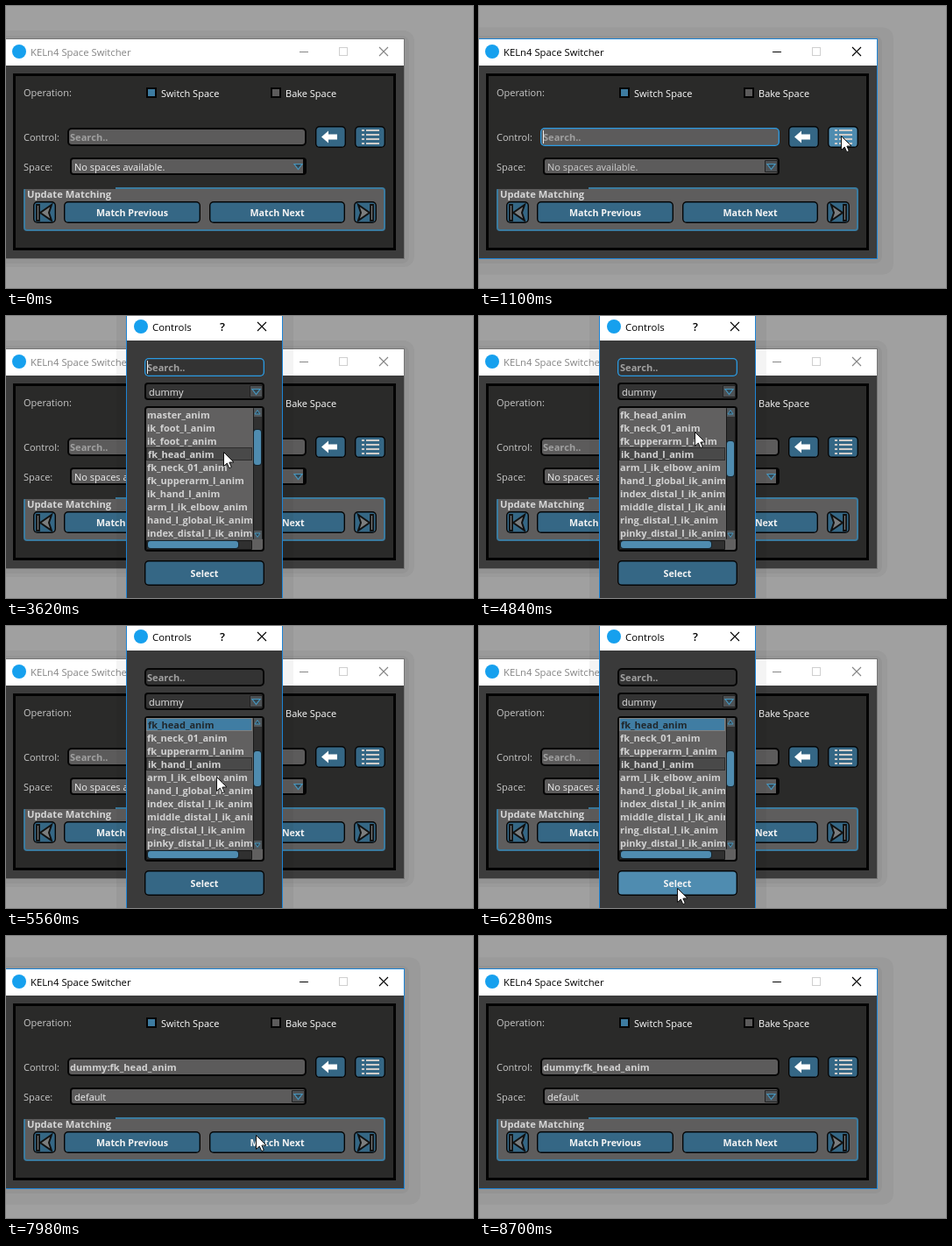
Recreate the animation shown at these times as an HTML page with a canvas. Size 533 px wide and 322 px high, loop 9.2 s.

```html
<!DOCTYPE html>
<html lang="en">
<head>
<meta charset="utf-8">
<title>Space Switcher</title>
<style>
html, body { margin: 0; width: 533px; height: 322px; overflow: hidden; background: #a0a0a0; }
canvas { display: block; }
</style>
</head>
<body>
<canvas id="stage" width="533" height="322"></canvas>
<script>
const ctx = document.getElementById('stage').getContext('2d');
const LOOP = 9200, STEP = 120;
const FONT = '"Open Sans", "Noto Sans", sans-serif';
const BLUE = '#356785', BRIGHT = '#4f8cb0', FOCUS = '#2b9be3', EDGE = '#1d84d6';
const FIELD = '#5c5b5b', DARK = '#333', PANEL = '#2a2a29', BLACK = '#050505';

const ITEMS = ['torso_body', 'fk_spine_01', 'torso_chest_ik', 'master', 'ik_foot_l', 'ik_foot_r',
  'fk_head', 'fk_neck_01', 'fk_upperarm_l', 'ik_hand_l', 'arm_l_ik_elbow', 'hand_l_global_ik',
  'index_distal_l_ik', 'middle_distal_l_ik', 'ring_distal_l_ik', 'pinky_distal_l_ik'
].map(s => s + '_anim');

const ENTER = 250, ACTIVATE = 1100, OPEN = 1220, SCROLL = 3620, PICK = 5200,
  CLOSE = 6290, DROP = 7360, LEAVE = 8700;

// pointer moves: start, duration, then the point reached
const HOME = [426, 264];
const MOVES = [
  [250, 240, 413, 148],
  [1850, 240, 382, 149],
  [2090, 840, 248, 155],
  [4720, 360, 245, 114],
  [5320, 240, 240, 172],
  [5560, 360, 226, 299],
  [6520, 600, 190, 190],
  [7860, 720, 502, 312]
];

function pointerAt(t) {
  if (t < ENTER || t >= LEAVE) return null;
  let [x, y] = HOME;
  for (const [from, span, toX, toY] of MOVES) {
    if (t < from) break;
    const u = Math.min(1, Math.floor((t - from) / STEP) * STEP / span);
    const e = u * (2 - u);
    x += (toX - x) * e;
    y += (toY - y) * e;
  }
  return [Math.round(x), Math.round(y)];
}

const blink = (t, since) => Math.floor((t - since) / 510) % 2 === 0;

function rect(x, y, w, h, c) {
  ctx.fillStyle = c;
  ctx.fillRect(x, y, w, h);
}

function round(x, y, w, h, r, c) {
  ctx.beginPath();
  ctx.roundRect(x, y, w, h, Math.max(0, r));
  ctx.fillStyle = c;
  ctx.fill();
}

// filled box with an inner border
function box(x, y, w, h, r, fill, edge, lw = 2) {
  round(x, y, w, h, r, edge);
  round(x + lw, y + lw, w - 2 * lw, h - 2 * lw, r - lw, fill);
}

function text(s, x, y, c, size = 11, weight = 400, align = 'left') {
  ctx.font = `${weight} ${size}px ${FONT}`;
  ctx.textAlign = align;
  ctx.fillStyle = c;
  ctx.fillText(s, x, y);
}

function poly(pts, fill, edge, lw = 1) {
  ctx.beginPath();
  for (const [x, y] of pts) ctx.lineTo(x, y);
  ctx.closePath();
  ctx.fillStyle = fill;
  ctx.fill();
  if (edge) {
    ctx.strokeStyle = edge;
    ctx.lineWidth = lw;
    ctx.stroke();
  }
}

function cross(x, y, c) {
  ctx.strokeStyle = c;
  ctx.lineWidth = 1.1;
  ctx.beginPath();
  ctx.moveTo(x, y); ctx.lineTo(x + 10, y + 10);
  ctx.moveTo(x + 10, y); ctx.lineTo(x, y + 10);
  ctx.stroke();
}

const badge = (x, y) => round(x - 8, y - 8, 16, 16, 8, '#16a0ee');

function button(x, y, w, h, label, hot) {
  box(x, y, w, h, 5, hot ? BRIGHT : BLUE, BLACK, 1.4);
  if (label) text(label, x + w / 2, y + h / 2 + 4, '#f4f4f4', 10.7, 700, 'center');
}

function field(x, y, w, value, c, fill, focus, caret) {
  box(x, y, w, 21, 5, fill, focus ? FOCUS : BLACK, focus ? 1.3 : 2);
  text(value, x + 3, y + 15, c, 11.1, 700);
  if (caret) rect(x + 3, y + 3, 1, 15, '#ececec');
}

function combo(x, y, w, value, c, fill, framed) {
  box(x, y, w, 20, 4, fill, BLACK);
  text(value, x + 5, y + 14.5, c);
  const ax = x + w - 17;
  if (framed) box(ax, y + 3, 15, 14, 1, '#4d5154', '#222', 1);
  else rect(x + w - 4, y + 2, 3, 16, BLACK);
  poly([[ax + 3, y + 7.5], [ax + 12, y + 7.5], [ax + 7.5, y + 13.5]], '#34454f', '#4795bd', 1.2);
}

function check(x, label, on) {
  box(x, 93, 12, 12, 0, on ? '#3d7ba0' : FIELD, BLACK);
  text(label, x + 17, 104, '#fff');
}

function skipButton(x, dir) {
  button(x, 223, 26, 25);
  ctx.save();
  ctx.translate(x + 13, 236);
  ctx.scale(dir, 1);
  poly([[-9, -9], [-6, -9], [-6, 9], [-9, 9]], '#7b7d7e', '#111', 1.8);
  poly([[-5, 0], [8, -9], [5, 0], [8, 9]], '#7b7d7e', '#111', 2);
  ctx.restore();
}

function listIcon() {
  for (let y = 141; y < 160; y += 5) {
    rect(406, y, 3, 2, '#d0cdca');
    rect(411, y, 15, 2, '#d0cdca');
  }
}

function shadow(active) {
  const d = active ? 7 : 0;
  round(-30, 28 - d / 2, 496 + d, 270 + d * 1.7, 12, '#9a9a9a');
  round(-30, 34, 490, 260, 8, '#949494');
}

function mainWindow(t, p) {
  const open = t >= OPEN && t < CLOSE;
  const active = t >= ACTIVATE && !open;
  const filled = t >= CLOSE;
  const focus = active && t < DROP;
  const ink = active ? '#000' : '#858585';

  shadow(active);
  rect(0, 38, 454, 250, '#3c3c3c');
  rect(0, 38, 454, 30, '#fff');
  ctx.strokeStyle = active ? EDGE : '#777';
  ctx.lineWidth = 1;
  ctx.strokeRect(-0.5, 37.5, 455, 251);

  badge(15, 52);
  text('KELn4 Space Switcher', 28, 56.5, ink, 11.3);
  rect(335, 52, 10, 1, ink);
  ctx.strokeStyle = '#cfcfcf';
  ctx.strokeRect(380.5, 47.5, 9, 9);
  cross(426, 47, ink);

  box(8, 77, 437, 202, 0, PANEL, '#020202', 3);
  text('Operation:', 20, 103, '#c8c8c8');
  check(160, 'Switch Space', true);
  check(302, 'Bake Space', false);

  text('Control:', 20, 154, '#c8c8c8');
  field(70, 139, 273, filled ? 'dummy:fk_head_anim' : 'Search..', filled ? '#d2d2d2' : '#a0a0a0',
    FIELD, focus, focus && blink(t, filled ? CLOSE : ACTIVATE));
  button(353, 137, 35, 25);
  poly([[360, 149.5], [368, 142.5], [368, 146.5], [378, 146.5], [378, 152.5], [368, 152.5], [368, 156.5]], '#fff');
  button(398, 137, 35, 25, '', t >= ENTER && t < OPEN);
  listIcon();

  text('Space:', 20, 188, '#c8c8c8');
  const bright = !active || t >= 7980;
  combo(73, 173, 270, filled ? 'default' : 'No spaces available.', bright ? '#f0f0f0' : '#cecece', FIELD, active);

  box(20, 207, 413, 50, 4, '#5e5d5d', '#3b7b9f');
  rect(20, 207, 105, 2, PANEL);
  rect(22, 209, 103, 13, '#5e5d5d');
  text('Update Matching', 24, 219, '#d6d6d6', 11.2, 700);
  skipButton(31, 1);
  button(66, 223, 156, 25, 'Match Previous');
  button(232, 223, 155, 25, 'Match Next');
  skipButton(397, -1);
}

function row(name, y, selected, hot) {
  if (hot) box(160, y, 121, 15, 0, '#494949', '#2d2d2d', 1);
  if (selected) {
    rect(160, y, 121, 15, '#407da3');
    ctx.strokeStyle = '#c0845c';
    ctx.lineWidth = 1;
    ctx.setLineDash([1, 1]);
    ctx.strokeRect(160.5, y + 0.5, 120, 14);
    ctx.setLineDash([]);
  }
  text(name, selected || hot ? 162 : 161, y + 12, selected ? '#20282d' : '#d2d2d2', 11, 700);
}

function list(t, p) {
  const top = t < SCROLL ? 0 : t < SCROLL + 3 * STEP ? 3 : 6;
  const hover = p[0] < 281 ? top + 3 : -1;

  box(158, 103, 137, 166, 4, '#616060', BLACK);
  ctx.save();
  ctx.beginPath();
  ctx.rect(160, 105, 121, 150);
  ctx.clip();
  for (let i = 0; i < 10; i++) {
    const n = top + i;
    row(ITEMS[n], 105 + i * 15, n === 6 && t >= PICK, n === hover);
  }
  ctx.restore();

  box(282, 105, 11, 150, 1, '#303030', '#181818', 1);
  box(160, 256, 121, 11, 1, '#303030', '#181818', 1);
  for (const [y, d] of [[110, -1], [250, 1]]) {
    rect(283, y - 5, 9, 10, '#50565a');
    poly([[284, y - d * 2], [290, y - d * 2], [287, y + d * 2.5]], '#30424d', '#4795bd');
  }
  box(282, 116 + top * 13 / 3, 10, 42, 4, BRIGHT, '#16242c', 1);
  box(161, 256, 105, 10, 4, BRIGHT, '#16242c', 1);
}

function dialog(t, p) {
  const focus = t < PICK;
  rect(126, 0, 202, 322, 'rgba(0,0,0,.045)');
  rect(137, 0, 179, 322, EDGE);
  rect(138, 0, 177, 322, '#3a3a3a');
  rect(138, 0, 177, 28, '#fff');
  badge(154, 12);
  text('Controls', 167, 17, '#000', 11.4);
  text('?', 247, 17, '#000', 13, 600, 'center');
  cross(287, 7, '#000');

  field(158, 48, 137, 'Search..', '#a0a0a0', DARK, focus, focus && blink(t, OPEN));
  combo(158, 76, 137, 'dummy', '#e4e4e4', DARK, true);
  list(t, p);
  button(158, 279, 137, 29, 'Select', p[1] > 279);
}

function cursor([x, y]) {
  const shape = [[0, 0], [0, 16], [3.8, 12.6], [6.3, 18.2], [8.8, 17], [6.4, 11.6], [11.5, 11.4]];
  poly(shape.map(([a, b]) => [x + a + 0.5, y + b + 0.5]), '#fff', '#111');
}

function draw(t) {
  const p = pointerAt(t);
  rect(0, 0, 533, 322, '#a0a0a0');
  mainWindow(t, p);
  if (t >= OPEN && t < CLOSE) dialog(t, p);
  if (p) cursor(p);
}

const start = performance.now();
function tick() {
  draw((performance.now() - start) % LOOP);
  requestAnimationFrame(tick);
}
tick();
</script>
</body>
</html>
```
